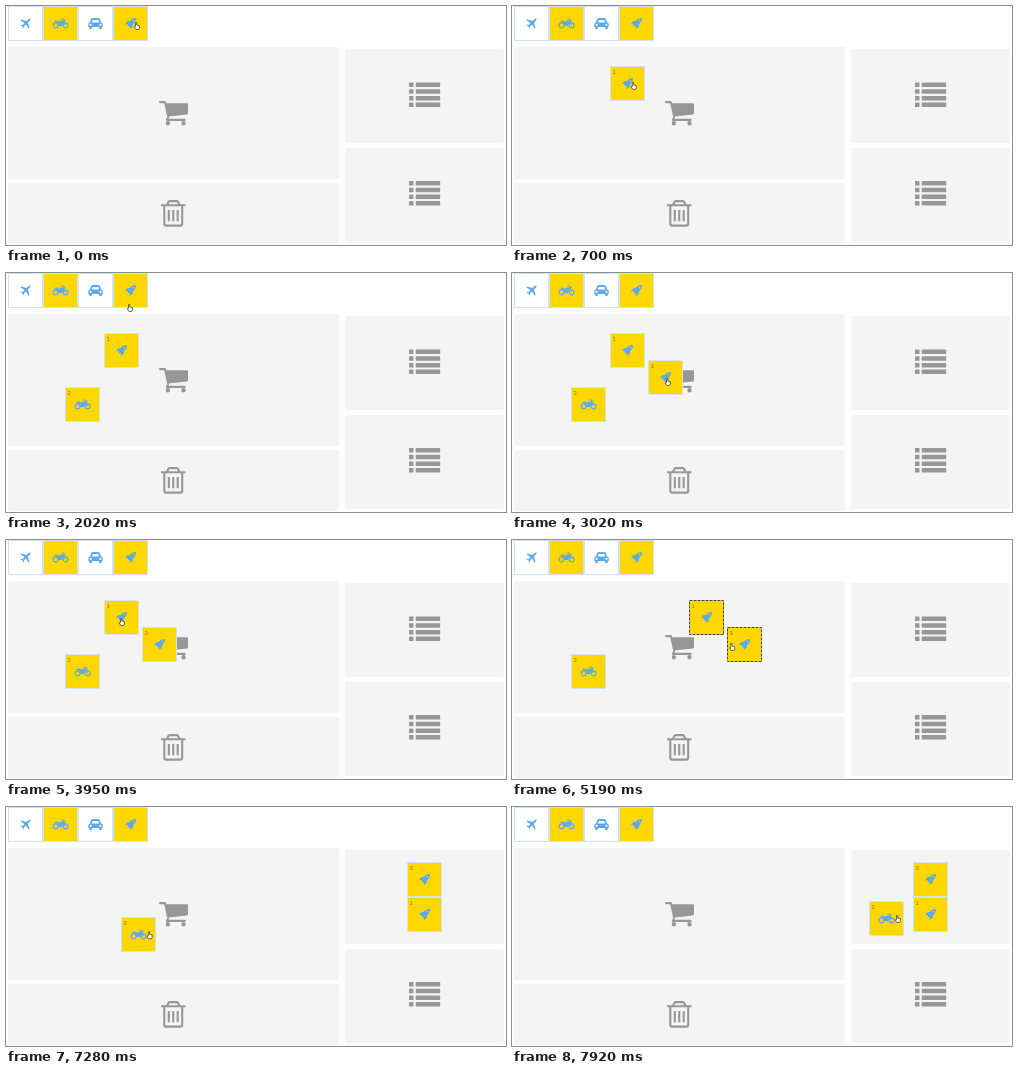
An HTML page with a canvas that plays this animation: 500 by 239 pixels, repeating every 8000 ms.

```html
<!DOCTYPE html>
<html lang="en">
<head>
<meta charset="utf-8">
<title>Drag and drop</title>
<style>
html, body { margin: 0; width: 100%; height: 100%; overflow: hidden; background: #fefefe; }
canvas { display: block; }
</style>
</head>
<body>
<canvas id="stage" width="500" height="239"></canvas>
<script>
const ctx = document.getElementById('stage').getContext('2d');
const LOOP = 8000, SIZE = 33;
const GOLD = '#ffd700', BLUE = '#5ba9ee', GREY = '#979797', PANEL = '#f4f4f4', EDGE = '#cfe3f4';

// Tile icons, centred on the origin
const icons = {
  plane: new Path2D('M5-5Q4-5.4 2.6-4L1-2.4-4.4-4-5.2-3.2-1-.6-2.8 1.6-4.4 1.3-5 1.9-2.9 2.9-1.9 5-1.3 4.4-1.6 2.8 .6 1 3.2 5.2 4 4.4 2.4-1 4-2.6Q5.4-4 5-5Z'),
  car: new Path2D('M-5.5-.9L-4.7-3.8Q-4.3-5.4-2.7-5.4H2.7Q4.3-5.4 4.7-3.8L5.5-.9Q7.2-.8 7.2 .7V3.6H6.3V4.4A1.35 1.35 0 0 1 3.6 4.4V3.6H-3.6V4.4A1.35 1.35 0 0 1-6.3 4.4V3.6H-7.2V.7Q-7.2-.8-5.5-.9ZM-3.6-.9H3.6L2.9-3.6H-2.9ZM-6 1.35a1.1 1.1 0 1 0 2.2 0a1.1 1.1 0 1 0-2.2 0ZM3.8 1.35a1.1 1.1 0 1 0 2.2 0a1.1 1.1 0 1 0-2.2 0Z'),
  rocket: new Path2D('M5.5-5.5Q1.6-5.6-.9-2.4L-3.3-2.3-5.6 .7-3 .6-2.9 1.5-1.5 2.9-.6 3-.7 5.6 2.3 3.3 2.4 .9Q5.6-1.6 5.5-5.5ZM2.3-3a.7 .7 0 1 0 1.4 0a.7 .7 0 1 0-1.4 0Z'),
  bike: new Path2D('M-7-2.6L-3.5-2.9-1.6-1.8 .6-3 2.6-2.6 2.2-4H.8V-5H3L3.6-3.6 5-4.4V-2.2L4-1.9 5.6 1.7 4.7 2.1 3.4-.8Q1.6 .6 1.6 2.6H-2Q-2.2-.6-4.8-1.4Z')
};
const bikeWheels = new Path2D('M-7.4 1.8a2.5 2.5 0 1 0 5 0a2.5 2.5 0 1 0-5 0M2.6 1.8a2.5 2.5 0 1 0 5 0a2.5 2.5 0 1 0-5 0');

const cart = new Path2D('M1 0H5.6Q7 0 7.4 2.2H28Q29 2.2 29 3.3V12.2Q29 13.2 28 13.4L9.8 15.5 10 16.7 9.6 17.8H25.6a1.1 1.1 0 0 1 0 2.2H7.8Q6.3 19.6 7 18L8.3 16.6 5.2 2.2H1A1.1 1.1 0 0 1 1 0ZM6.7 22.3a2.2 2.2 0 1 0 4.4 0a2.2 2.2 0 1 0-4.4 0ZM22.3 22.3a2.2 2.2 0 1 0 4.4 0a2.2 2.2 0 1 0-4.4 0Z');
const bin = new Path2D('M0 5.3H24.5M6 5L7.6 1.6Q8 1.1 9 1.1H15.5Q16.5 1.1 16.9 1.6L18.5 5M3.3 6V23.4Q3.3 25.6 5.2 25.6H19.3Q21.2 25.6 21.2 23.4V6M7.8 10V21.2M12.25 10V21.2M16.7 10V21.2');
const hand = new Path2D('M-1.5-3.5H-.3V-1L2.4-.3V2L1.6 3.5H-1.2L-2.8 .8-1.5 .6Z');

// Pointer track: time, x, y
const track = [
  [0, 131, 20], [90, 131, 20], [480, 122, 80], [700, 122, 80],
  [1100, 64, 27], [1260, 64, 27], [1400, 64, 90], [1590, 86, 141], [1750, 86, 141],
  [2020, 124, 35], [2150, 127, 22], [2500, 127, 22], [2960, 156, 109], [3150, 156, 109],
  [3900, 116, 82], [4300, 116, 82], [4570, 141, 107], [5110, 141, 107],
  [5190, 220, 107], [5870, 406, 100], [5990, 406, 100], [6360, 142, 124],
  [6450, 88, 132], [7150, 88, 132], [7850, 386, 112]
];

function pointer(t) {
  const i = track.findIndex(k => k[0] > t);
  if (i < 0) return track[track.length - 1].slice(1);
  const [t0, x0, y0] = track[i - 1], [t1, x1, y1] = track[i];
  const p = (t - t0) / (t1 - t0);
  return [x0 + (x1 - x0) * p, y0 + (y1 - y0) * p];
}

// Place of an item held at (dx, dy) between two times
function dragged(t, from, to, dx, dy) {
  const [x, y] = pointer(Math.min(Math.max(t, from), to));
  return [Math.round(x - dx), Math.round(y - dy)];
}

function at(x, y, draw) {
  ctx.save();
  ctx.translate(x, y);
  draw();
  ctx.restore();
}

function panel(x, y, w, h) {
  ctx.fillStyle = PANEL;
  ctx.beginPath();
  ctx.roundRect(x, y, w, h, 2);
  ctx.fill();
}

function listIcon(x, y) {
  ctx.fillStyle = GREY;
  ctx.beginPath();
  for (let i = 0; i < 4; i++) {
    ctx.roundRect(x, y + i * 6.7, 4.5, 4.5, .5);
    ctx.roundRect(x + 6.7, y + i * 6.7, 24.5, 4.5, .5);
  }
  ctx.fill();
}

function tile(x, y, name, fill, label = '', selected = false) {
  at(x, y, () => {
    ctx.fillStyle = fill;
    ctx.fillRect(0, 0, SIZE, SIZE);
    ctx.strokeStyle = selected ? '#fff3b0' : EDGE;
    ctx.strokeRect(-.5, -.5, SIZE + 1, SIZE + 1);
    if (selected) {
      ctx.setLineDash([3, 1]);
      ctx.strokeStyle = '#444';
      ctx.strokeRect(-.5, -.5, SIZE + 1, SIZE + 1);
      ctx.setLineDash([]);
    }
    ctx.fillStyle = '#7d7440';
    ctx.font = '6px "Liberation Sans", sans-serif';
    ctx.fillText(label, 1.5, 6.5);
    ctx.translate(SIZE / 2, SIZE / 2);
    ctx.fillStyle = ctx.strokeStyle = BLUE;
    ctx.fill(icons[name], 'evenodd');
    if (name === 'bike') {
      ctx.lineWidth = 1.2;
      ctx.stroke(bikeWheels);
    }
  });
}

function scene(t) {
  const listed = t >= 5950;
  ctx.fillStyle = '#fefefe';
  ctx.fillRect(0, 0, 500, 239);
  panel(2, 41, 331, 132);
  panel(2, 177, 331, 61);
  panel(339, 43, 159, 94);
  panel(339, 142, 159, 94);

  at(153, 95, () => {
    ctx.fillStyle = GREY;
    ctx.fill(cart);
  });
  at(155, 194, () => {
    ctx.strokeStyle = GREY;
    ctx.lineWidth = 2.1;
    ctx.stroke(bin);
  });
  if (!listed) listIcon(403, 76.5);
  listIcon(403, 175);

  tile(3, 1, 'plane', '#fff');
  tile(38, 1, 'bike', GOLD);
  tile(73, 1, 'car', '#fff');
  tile(108, 1, 'rocket', GOLD);

  // The two rockets travel together, then snap into the list
  const shift = t < 5110 ? [0, 0] : dragged(t, 5110, 5950, 141, 107);
  const moved = ([x, y]) => [x + shift[0], y + shift[1]];
  const marked = since => t >= since && t < 6450;
  if (t >= 90) {
    const pos = listed ? [402, 91] : moved(dragged(t, 90, 480, 23, 19));
    tile(...pos, 'rocket', GOLD, '1', marked(4360));
  }
  if (t >= 2500) {
    const pos = listed ? [402, 56] : moved(dragged(t, 2500, 2960, 19, 21));
    tile(...pos, 'rocket', GOLD, '3', marked(4720));
  }
  if (t >= 1260) {
    const pos = t < 7150 ? dragged(t, 1260, 1590, 26, 26) : dragged(t, 7150, 7850, 28, 17);
    tile(...pos, 'bike', GOLD, '2');
  }

  at(...pointer(t), () => {
    ctx.strokeStyle = '#555';
    ctx.fillStyle = '#fff';
    ctx.lineWidth = .9;
    ctx.fill(hand);
    ctx.stroke(hand);
  });
}

function tick() {
  scene(performance.now() % LOOP);
  requestAnimationFrame(tick);
}
tick();
</script>
</body>
</html>
```
